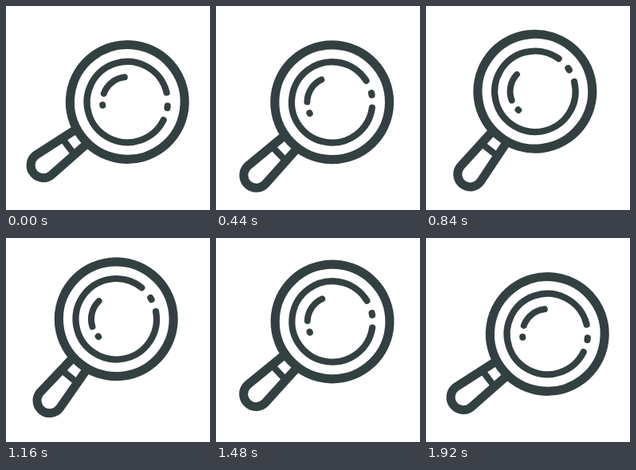
These frames come from a looping animation (256 px wide and 256 px high, 1.96 s). An HTML page with a canvas:

```html
<!DOCTYPE html>
<html lang="en">
<head>
<meta charset="utf-8">
<title>Magnifier</title>
<style>
html, body { margin: 0; height: 100%; overflow: hidden; background: #fff; }
canvas { display: block; width: 256px; height: 256px; }
</style>
</head>
<body>
<canvas width="256" height="256"></canvas>
<script>
const LOOP = 1960, STEP = 40, CYCLE = 1920;
const ctx = document.querySelector('canvas').getContext('2d');
const rad = deg => deg * Math.PI / 180;

function arc(radius, from, to, width) {
  ctx.lineWidth = width;
  ctx.beginPath();
  ctx.arc(0, 0, radius, rad(from), rad(to));
  ctx.stroke();
}

// The handle lies along negative x, the lens centre is the origin.
function drawHandle() {
  ctx.lineCap = 'butt';
  ctx.lineWidth = 11;
  ctx.beginPath();
  ctx.moveTo(-71, 11.2);
  ctx.arc(-132, 0, 15.8, rad(86), rad(274));
  ctx.lineTo(-71, -11.2);
  ctx.stroke();
  ctx.lineWidth = 8.2;
  ctx.beginPath();
  ctx.moveTo(-92.8, -12);
  ctx.lineTo(-92.8, 12);
  ctx.stroke();
}

function drawReflections() {
  ctx.lineCap = 'round';
  arc(50.7, 19.5, 339.5, 8.2);
  arc(50.7, -1.4, 1.4, 8.2);
  arc(31.3, 192.6, 256.6, 8);
  arc(31.3, 165, 166.6, 8);
}

function draw(time) {
  const phase = 2 * Math.PI * time / CYCLE;
  const sway = Math.cos(phase + 0.025);
  const tilt = 44.75 - 7.75 * sway;
  const spin = 21 * sway - 14;
  const lift = 8 * Math.sin(phase) + 0.8 * Math.sin(2 * phase);

  ctx.setTransform(1, 0, 0, 1, 0, 0);
  ctx.fillStyle = '#fff';
  ctx.fillRect(0, 0, 256, 256);
  ctx.strokeStyle = '#334041';

  ctx.translate(84.8, 171.3 + lift);
  ctx.rotate(-rad(tilt));
  ctx.translate(84.5, 0);
  drawHandle();
  arc(71.9, 0, 360, 11.2);
  ctx.rotate(rad(tilt + spin));
  drawReflections();
}

const start = performance.now();
function tick() {
  const elapsed = (performance.now() - start) % LOOP;
  draw(Math.floor(elapsed / STEP) * STEP);
  requestAnimationFrame(tick);
}
tick();
</script>
</body>
</html>
```
